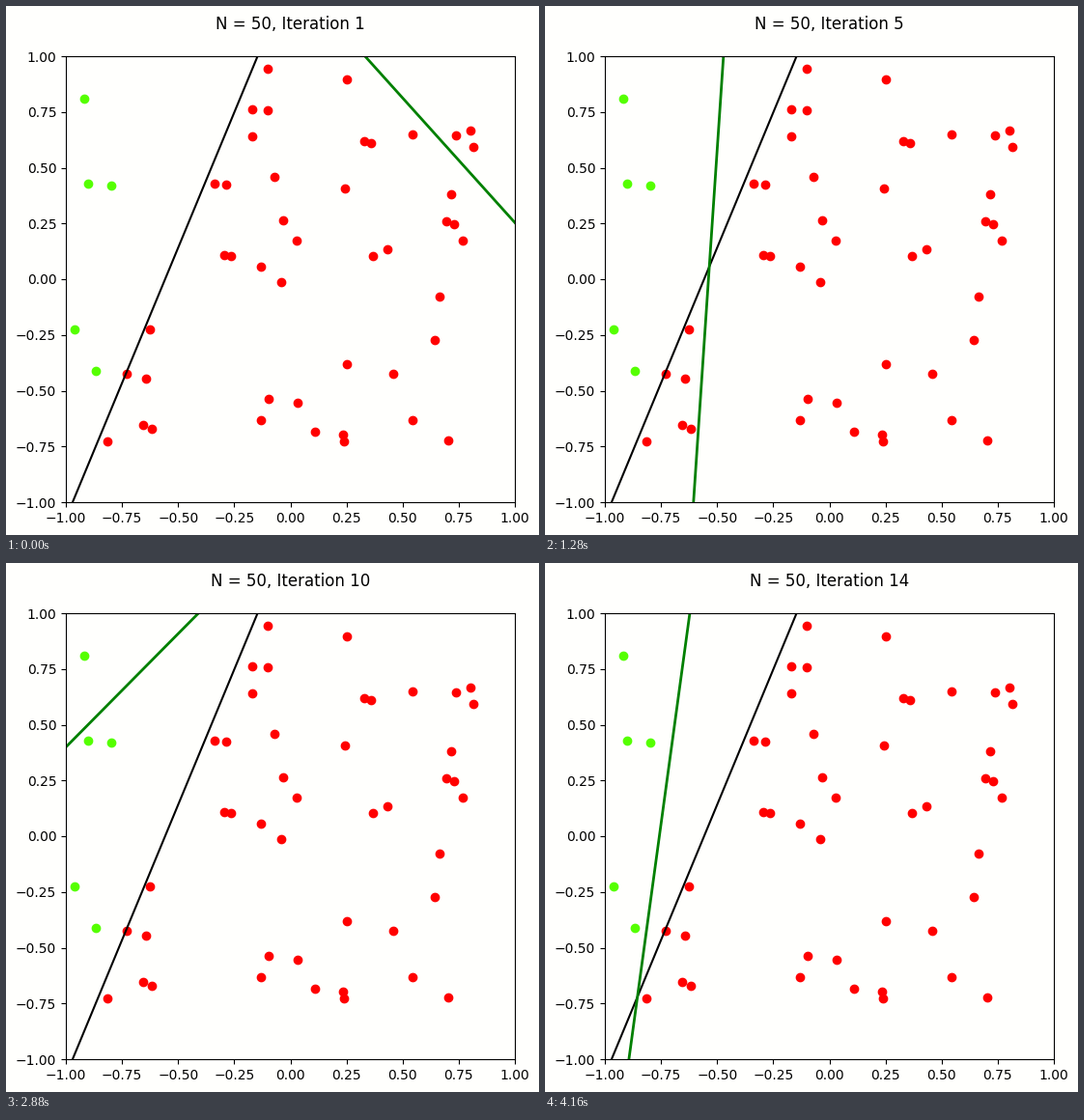
A matplotlib script that plays this animation: 552x548 px, repeating every 4480 ms.

```python
import numpy as np
import matplotlib.pyplot as plt
from matplotlib.animation import FuncAnimation

W, H, DPI = 552, 548, 100
STEP_MS = 320
PAPER = "#fffffd"

greens = np.array([(-.918, .810), (-.901, .429), (-.796, .422),
                   (-.961, -.227), (-.865, -.413)])
reds = np.array([
    (-.099, .942), (.252, .896), (-.168, .760), (-.103, .758), (-.170, .639),
    (.327, .617), (.357, .612), (.546, .649), (.738, .647), (.802, .667),
    (.815, .591), (-.338, .429), (-.286, .424), (-.071, .457), (.243, .407),
    (.716, .383), (-.032, .266), (.695, .258), (.729, .245), (.028, .173),
    (.768, .171), (-.295, .108), (-.265, .106), (-.133, .058), (-.041, -.013),
    (.366, .102), (.434, .136), (.665, -.076), (-.626, -.227), (.643, -.271),
    (-.729, -.424), (-.643, -.444), (-.656, -.654), (-.617, -.671),
    (-.815, -.729), (-.097, -.537), (.032, -.554), (-.133, -.630),
    (.108, -.682), (.234, -.695), (.239, -.727), (.252, -.381),
    (.458, -.426), (.546, -.630), (.705, -.725)])

# Misclassified point used by each perceptron update: (class, index)
updates = [("r", 34), ("r", 8), ("g", 3), ("g", 4), ("r", 38), ("r", 30),
           ("g", 1), ("r", 30), ("g", 4), ("r", 30), ("g", 2), ("r", 4),
           ("g", 4), ("r", 12)]


def signed_input(kind, index):
    sign, points = (1, reds) if kind == "r" else (-1, greens)
    return sign * np.array([1, *points[index]])


weights = np.cumsum([signed_input(*u) for u in updates], axis=0)
ys = np.array([-3, 3])

fig = plt.figure(figsize=(W / DPI, H / DPI), dpi=DPI, facecolor=PAPER)
ax = fig.add_axes([62 / W, 34 / H, 465 / W, 462 / H], facecolor=PAPER)
ax.set(xlim=(-1, 1), ylim=(-1, 1))
ax.scatter(*reds.T, color="#ff0000")
ax.scatter(*greens.T, color="#55ff00")
ax.plot(-.558 + .412 * ys, ys, color="black", lw=1.5)
boundary, = ax.plot([], [], color="green", lw=2)
title = ax.set_title("", pad=20)


def draw(i):
    w0, w1, w2 = weights[i]
    boundary.set_data(-(w0 + w2 * ys) / w1, ys)
    title.set_text(f"N = 50, Iteration {i + 1}")
    return boundary, title


anim = FuncAnimation(fig, draw, frames=len(updates), interval=STEP_MS,
                     init_func=lambda: draw(0), repeat=True, repeat_delay=0)
plt.show()
```
